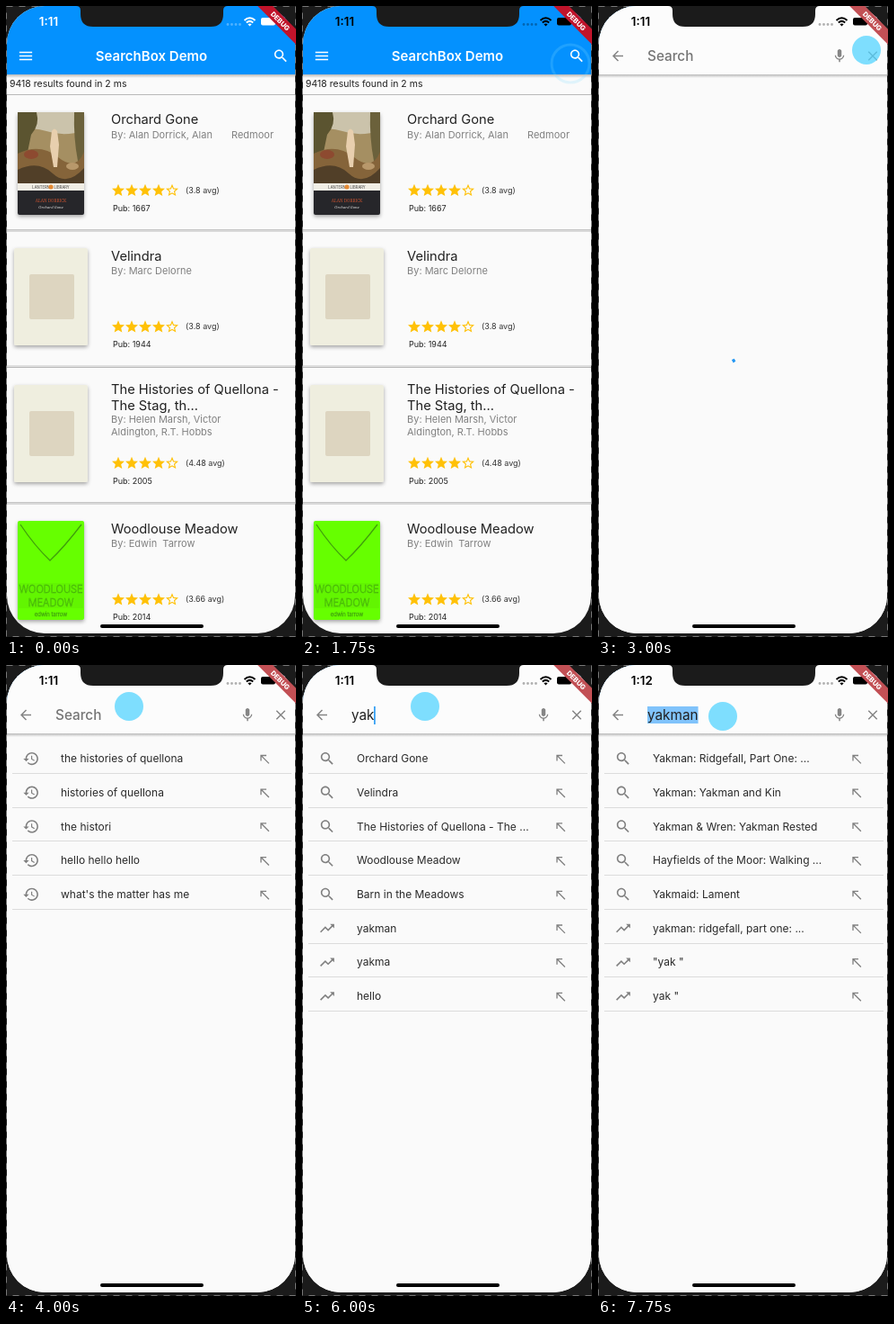
Recreate the animation shown at these times as an HTML page. Size 323x701 px, loop 8000 ms.

```html
<!DOCTYPE html>
<html lang="en">
<head>
<meta charset="utf-8">
<title>Search demo</title>
<style>
html, body { margin: 0; width: 323px; height: 701px; overflow: hidden; background: #1b1b1b; }
svg { display: block; font-family: Inter, Roboto, sans-serif; }
text { white-space: pre; }
</style>
</head>
<body>
<svg id="stage" width="323" height="701" viewBox="0 0 323 701"></svg>
<script>
const icons = {
  menu: 'M3 18h18v-2H3v2zm0-5h18v-2H3v2zm0-7v2h18V6H3z',
  search: 'M15.5 14h-.79l-.28-.27C15.41 12.59 16 11.11 16 9.5 16 5.91 13.09 3 9.5 3S3 5.91 3 9.5 5.91 16 9.5 16c1.61 0 3.09-.59 4.23-1.57l.27.28v.79l5 4.99L20.49 19l-4.99-5zm-6 0C7.01 14 5 11.99 5 9.5S7.01 5 9.5 5 14 7.01 14 9.5 11.99 14 9.5 14z',
  back: 'M20 11H7.83l5.59-5.59L12 4l-8 8 8 8 1.41-1.41L7.83 13H20v-2z',
  close: 'M19 6.41L17.59 5 12 10.59 6.41 5 5 6.41 10.59 12 5 17.59 6.41 19 12 13.41 17.59 19 19 17.59 13.41 12z',
  mic: 'M12 14c1.66 0 3-1.34 3-3V5c0-1.66-1.34-3-3-3S9 3.34 9 5v6c0 1.66 1.34 3 3 3zm5.3-3c0 3-2.54 5.1-5.3 5.1S6.7 14 6.7 11H5c0 3.41 2.72 6.23 6 6.72V21h2v-3.28c3.28-.48 6-3.3 6-6.72h-1.7z',
  history: 'M13 3c-4.97 0-9 4.03-9 9H1l3.89 3.89.07.14L9 12H6c0-3.87 3.13-7 7-7s7 3.13 7 7-3.13 7-7 7c-1.93 0-3.68-.79-4.94-2.06l-1.42 1.42C8.27 19.99 10.51 21 13 21c4.97 0 9-4.03 9-9s-4.03-9-9-9zm-1 5v5l4.28 2.54.72-1.21-3.5-2.08V8H12z',
  trend: 'M16 6l2.29 2.29-4.88 4.88-4-4L2 16.59 3.41 18l6-6 4 4 6.3-6.29L22 12V6z',
  fill: 'M5 15h2V8.41L18.59 20 20 18.59 8.41 7H15V5H5v10z',
  star: 'M12 17.27L18.18 21l-1.64-7.03L22 9.24l-7.19-.61L12 2 9.19 8.63 2 9.24l5.46 4.73L5.82 21z',
  hollow: 'M22 9.24l-7.19-.62L12 2 9.19 8.63 2 9.24l5.46 4.73L5.82 21 12 17.27 18.18 21l-1.63-7.03L22 9.24zM12 15.4l-3.76 2.27 1-4.28-3.32-2.88 4.38-.38L12 6.1l1.71 4.04 4.38.38-3.32 2.88 1 4.28L12 15.4z'
};

const icon = (name, x, y, size, color) =>
  `<path d="${icons[name]}" fill="${color}" transform="translate(${x - size / 2} ${y - size / 2}) scale(${size / 24})"/>`;
const text = (s, x, y, size, color, more = '') =>
  `<text x="${x}" y="${y}" font-size="${size}" fill="${color}" ${more}>${s.replace(/&/g, '&amp;')}</text>`;
const rect = (x, y, w, h, color, more = '') =>
  `<rect x="${x}" y="${y}" width="${w}" height="${h}" fill="${color}" ${more}/>`;
const path = (d, color, more = '') => `<path d="${d}" fill="${color}" ${more}/>`;
const middle = 'text-anchor="middle" ';

// Book covers
const paintedCover = () => rect(13, 118, 74, 114, '#25282b', 'rx="2" filter="url(#lift)"') +
  rect(13, 118, 74, 79, '#a58f62') +
  path('M13 118H87V138Q66 146 45 139T13 144Z', '#cbc3ab') +
  path('M13 118H34Q38 132 28 143L22 172H13Z', '#5b5430') +
  path('M76 118H87V172H80Q75 146 76 118Z', '#6b613b') +
  path('M13 164Q38 152 58 168T87 162V197H13Z', '#85643a') +
  path('M13 182Q36 171 52 186T87 180V197H13Z', '#513f28') +
  path('M51 139q3-5 6 0l2 15-2 25h-4l-4-23z', '#e8cfae') +
  '<ellipse cx="28" cy="165" rx="8" ry="5" fill="#8d4a30"/><ellipse cx="74" cy="178" rx="7" ry="4" fill="#b8986b"/>' +
  rect(13, 197, 74, 8, '#f1eee5') +
  text('LANTERN    LIBRARY', 50, 202.5, 4.2, '#444', middle) +
  '<circle cx="50" cy="201" r="2.6" fill="#e48a35"/>' +
  text('ALAN DORRICK', 50, 217.5, 4.6, '#c4502f', middle + 'font-family="Noto Serif, serif"') +
  text('Orchard Gone', 50, 224.5, 4.2, '#ddd', middle + 'font-style="italic" font-family="Noto Serif, serif"');

const blankCover = y => rect(9, y, 82, 108, '#efeedf', 'rx="2" filter="url(#lift)"') +
  rect(26, y + 29, 50, 50, '#ddd5c0', 'rx="2"');

const greenCover = () => rect(13, 572, 74, 110, '#66ff00', 'rx="2" filter="url(#lift)"') +
  path('M16 576Q32 600 49 616Q65 601 84 576', 'none', 'stroke="#3f9f0c" stroke-width="1.3"') +
  rect(14, 641, 72, 28, '#55d807', 'opacity=".25"') +
  [['WOODLOUSE', 652, 11], ['MEADOW', 667, 11], ['edwin tarrow', 678, 6]].map(([s, y, size]) =>
    text(s, 50, y, size, 'none', middle + 'stroke="#43a80d" stroke-width=".45" font-weight="300"')).join('');

const books = [
  { title: ['Orchard Gone'], by: ['By: Alan Dorrick, Alan'], avg: '3.8', year: 1667 },
  { title: ['Velindra'], by: ['By: Marc Delorne'], avg: '3.8', year: 1944 },
  { title: ['The Histories of Quellona -', 'The Stag, th...'], by: ['By: Helen Marsh, Victor', 'Aldington, R.T. Hobbs'], avg: '4.48', year: 2005 },
  { title: ['Woodlouse Meadow'], by: ['By: Edwin  Tarrow'], avg: '3.66', year: 2014 }
];

const bookRow = ({ title, by, avg, year }, i) => {
  const dy = 151.5 * i, two = title.length > 1;
  const top = dy + (two ? 127.5 : 131), byTop = dy + (two ? 160 : 146.5);
  return title.map((s, n) => text(s, 117, top + 18 * n, 14.7, '#212121')).join('') +
    by.map((s, n) => text(s, 117, byTop + 13.5 * n, 11, '#808080')).join('') +
    [0, 1, 2, 3, 4].map(n => icon(n < 4 ? 'star' : 'hollow', 125 + 15 * n, 204.8 + dy, 16.8, '#ffc107')).join('') +
    text(`(${avg} avg)`, 200, 207.7 + dy, 9, '#333') +
    text('Pub: ' + year, 119, 227.7 + dy, 9, '#222') +
    (i ? rect(1, 96.5 + dy, 321, 1, '#c6c6c6') : '') + rect(1, 98 + dy, 321, 1, '#b9b9b9');
};

const resultsPage = rect(0, 0, 323, 701, '#fafafa') + rect(0, 76, 323, 4, 'url(#shade)') +
  rect(0, 0, 323, 76, '#0491fe') +
  icon('menu', 22, 55.5, 19, '#fff') + icon('search', 306, 55.5, 19, '#fff') +
  text('SearchBox Demo', 162, 61, 15, '#fff', middle + 'font-weight="600"') +
  text('9418 results found in 2 ms', 4, 89.7, 10.5, '#212121') +
  books.map(bookRow).join('') + text('Redmoor', 251, 146.5, 11, '#808080') +
  paintedCover() + blankCover(269) + blankCover(421) + greenCover();

// Suggestion lists
const suggestions = (rows, kind) => rows.map((s, i) => {
  const y = 104 + 37.7 * i;
  return icon(kind || (i < 5 ? 'search' : 'trend'), 28, y, 19, '#808080') +
    text(s, 61, y + 4.2, 12, '#2a2a2a') + icon('fill', 288, y + .5, 16, '#808080') +
    rect(7, Math.round(y + 16), 311, 1, '#dcdcdc');
}).join('');

const lists = [
  '',
  suggestions(['the histories of quellona', 'histories of quellona', 'the histori', 'hello hello hello', "what's the matter has me"], 'history'),
  suggestions(['Orchard Gone', 'Velindra', 'The Histories of Quellona - The ...', 'Woodlouse Meadow', 'Barn in the Meadows', 'yakman', 'yakma', 'hello']),
  suggestions(['Yakman: Ridgefall, Part One: ...', 'Yakman: Yakman and Kin', 'Yakman & Wren: Yakman Rested', 'Hayfields of the Moor: Walking ...', 'Yakmaid: Lament', 'yakman: ridgefall, part one: ...', '"yak "', 'yak "'])
];

const searchPage = rect(0, 0, 323, 701, '#fafafa') + rect(0, 76, 323, 4, 'url(#shade)') +
  rect(0, 0, 323, 76, '#fcfcfc') +
  icon('back', 22, 55.5, 18, '#858585') + icon('mic', 269, 55.5, 18, '#858585') +
  icon('close', 306, 55.5, 18, '#858585') +
  rect(55, 46, 0, 19, '#80c3fb', 'id="selection"') +
  text('', 55, 61, 15.3, '#212121', 'id="query"') +
  rect(55, 46, 1.6, 20, '#2196f3', 'id="caret"') + '<g id="list"></g>';

const statusBar = '<g id="status">' +
  text('1:11', 36.8, 21.8, 13.4, 'inherit', 'id="clock" font-weight="600" style="fill:inherit"') +
  [247, 251.5, 256, 260.5].map(x => `<circle cx="${x}" cy="20.5" r="1.4" opacity=".3"/>`).join('') +
  '<g fill="none" stroke-width="2" id="waves"><path d="M265.5 16q6-5.5 12 0M267.8 18.5q3.7-3.2 7.4 0"/></g>' +
  '<path d="M269.4 20.2q2.1-1.6 4.2 0l-2.1 2.3z"/>' +
  '<rect x="284" y="13" width="16" height="8.5" rx="2"/></g>';

const stage = document.getElementById('stage');
stage.innerHTML = `<defs>
  <clipPath id="screen"><rect x="1" width="321" height="697" rx="42"/></clipPath>
  <linearGradient id="shade" x2="0" y2="1"><stop stop-color="#000" stop-opacity=".26"/><stop offset="1" stop-color="#000" stop-opacity="0"/></linearGradient>
  <filter id="lift" x="-20%" y="-20%" width="140%" height="140%"><feDropShadow dx="0" dy="2" stdDeviation="2" flood-opacity=".35"/></filter>
  </defs>
  ${rect(0, 0, 323, 701, '#1b1b1b')}
  ${rect(.5, .5, 322, 700, 'none', 'stroke="#777" stroke-dasharray="7 7"')}
  <g clip-path="url(#screen)">
    <g>${resultsPage}</g><g id="page">${searchPage}</g>
    <path id="spinner" fill="none" stroke="#2196f3" stroke-width="3.2"/>
    ${statusBar}
    ${rect(105, 687, 115, 4, '#000', 'rx="2"')}
  </g>
  ${path('M78 0Q83 0 83 5V9Q83 23 97 23H228Q242 23 242 9V5Q242 0 247 0Z', '#1b1b1b')}
  <g transform="translate(305.5 16.8) rotate(45)">
    ${rect(-40, -6, 80, 12, '#c0142b', 'id="banner"')}
    ${text('DEBUG', 0, 2.8, 7.6, '#fff', middle + 'font-weight="800"')}
  </g>
  <circle id="touch" r="16" fill="#4dd2ff" opacity=".72"/>
  <circle id="ring" cx="299" cy="64" fill="none" stroke="#7fdcff" stroke-width="3" opacity=".22"/>`;

const el = {};
stage.querySelectorAll('[id]').forEach(node => el[node.id] = node);
const set = (id, attrs) => { for (const k in attrs) el[id].setAttribute(k, attrs[k]); };
const show = (id, on) => set(id, { visibility: on ? 'visible' : 'hidden' });
const clamp = v => Math.min(1, Math.max(0, v));
const ease = v => { v = clamp(v); return v * v * (3 - 2 * v); };

const touchPath = [[250, 224, 112], [750, 299, 49], [3000, 299, 49], [3500, 137, 46], [7500, 137, 46], [7750, 139, 57], [8000, 139, 57]];
function touchAt(t) {
  const i = Math.max(1, touchPath.findIndex(p => p[0] >= t));
  const [a, b] = [touchPath[i - 1], touchPath[i]];
  const k = ease((t - a[0]) / (b[0] - a[0]));
  return { cx: a[1] + (b[1] - a[1]) * k, cy: a[2] + (b[2] - a[2]) * k };
}

function spinnerArc(t) {
  const cycles = (t - 3000) / 1333, n = Math.floor(cycles), p = cycles - n;
  const reach = 310, head = ease(2 * p), tail = ease(2 * p - 1);
  const start = 144 + .244 * (t - 3000) + reach * (n + tail);
  const sweep = Math.max(15, reach * (head - tail));
  const point = deg => {
    const a = deg * Math.PI / 180;
    return `${163 + 13.5 * Math.cos(a)} ${387.5 + 13.5 * Math.sin(a)}`;
  };
  return `M${point(start)}A13.5 13.5 0 ${sweep > 180 ? 1 : 0} 1 ${point(start + sweep)}`;
}

const typedAt = [5250, 5500, 6000, 6250, 6500, 6750];
let shownList = 0;

function draw(t) {
  const dark = t >= 1750, fade = clamp((t - 1750) / 325);
  set('page', { opacity: fade });
  set('status', { fill: dark ? '#000' : '#fff' });
  set('waves', { stroke: dark ? '#000' : '#fff' });
  set('banner', { fill: fade > .5 ? '#c25055' : '#c0142b' });
  el.clock.textContent = t < 6500 ? '1:11' : '1:12';

  show('spinner', t >= 2000 && t < 3500);
  set('spinner', { d: spinnerArc(t) });

  show('touch', t >= 250 && (t < 1500 || t >= 2500));
  set('touch', touchAt(t));
  show('ring', t >= 1500 && t < 2250);
  set('ring', { r: 16 + 5 * clamp((t - 1500) / 250) });

  const typed = 'yakman'.slice(0, typedAt.filter(at => t >= at).length);
  el.query.textContent = typed || 'Search';
  set('query', { fill: typed ? '#212121' : '#757575', 'font-weight': typed ? 400 : 500 });
  const width = typed ? el.query.getComputedTextLength() : 0, selected = t >= 7250;
  set('selection', { width: selected ? width : 0 });
  const blink = .5 - .5 * Math.cos((t - 4000) * Math.PI / 500);
  set('caret', { x: 54.6 + width, opacity: t < 3750 || selected ? 0 : typed ? 1 : blink });

  const list = (t >= 3500) + (t >= 5500) + (t >= 7000);
  if (list !== shownList) el.list.innerHTML = lists[shownList = list];
}

const begin = performance.now();
function tick() {
  const t = (performance.now() - begin) % 8000;
  draw(Math.floor(t / 250) * 250);
  requestAnimationFrame(tick);
}
tick();
</script>
</body>
</html>
```
